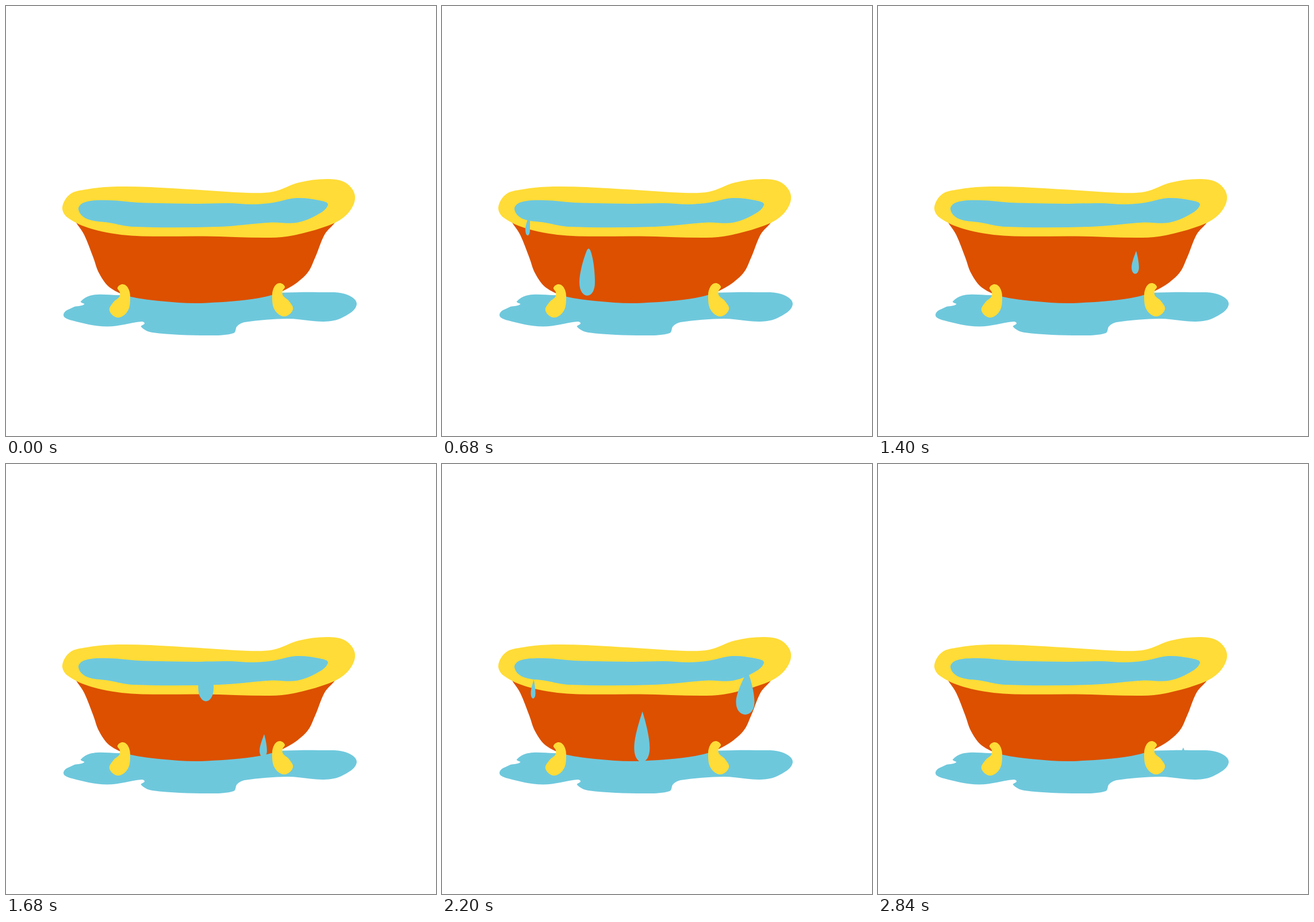
Write an HTML page that moves like this. It is 748 by 748 pixels and loops after 2.88 s.

```html
<!DOCTYPE html>
<html lang="en">
<head>
<meta charset="utf-8">
<title>Dripping bathtub</title>
<style>
  html, body { margin: 0; width: 100%; height: 100%; overflow: hidden; background: #fff; }
  svg { display: block; width: 100%; height: 100%; }
</style>
</head>
<body>
<svg viewBox="0 0 748 748" xmlns="http://www.w3.org/2000/svg">
  <defs>
    <clipPath id="fall">
      <path id="basin"/>
      <rect x="0" y="354" width="748" height="174"/>
    </clipPath>
  </defs>
  <g id="still"></g>
  <g id="drops" clip-path="url(#fall)"></g>
</svg>
<script>
const LOOP = 2880, STEP = 40;
const BLUE = '#6ec8dc', YELLOW = '#ffdc37', ORANGE = '#dc5000';

// Key points of each closed outline
const puddle = '100,537 117,524 136,519 130,514 150,503 195,503 300,505 485,498.5 545,498 590,501 610,519 585,542 553,549 490,544 415,550 402,557 396,569 350,573 255,568 235,558 241,552 236,549 175,557.5 115,547';
const tub = '116,362 136,398 152,438 162,465 181,490 218,506 300,516 350,516.5 440,508 487,493 523,466 538,437 554,398 577,366 560,352 130,352';
const rim = '98,350 112,327 140,319 182,314.5 250,315 330,319.5 420,325 465,323 510,307 558,301 590,307 607,330 597,358 568,379 500,399 460,403 345,400.5 218,399.5 150,388 107,368';
const water = '126,353 138,341 180,338 230,342 330,344 385,343 430,345 465,342 505,334 547,338.5 560,346 540,364 505,377 462,376.5 370,384 222,384 180,377 140,370';
const foot = '194,490 203,484 212,490 216,505 212,530 195,542 180,530 187,515 197,506 198,498';

// (x, y): tip of the drop at time t; v: px per ms; w: half width, h: height
const drops = [
  { x: 255, y: 422, t: 680, v: .25, w: 13.5, h: 82, lean: -2.5, round: 3 },
  { x: 152, y: 447, t: 1120, v: .195, w: 4, h: 38, lean: -3 },
  { x: 550, y: 491, t: 1120, v: .44, w: 4.2, h: 32 },
  { x: 449, y: 382, t: 1120, v: .157, w: 6.4, h: 40, lean: -1.5 },
  { x: 348.6, y: 430.5, t: 2200, v: .203, w: 13.5, h: 88, lean: -.8 },
  { x: 531, y: 426, t: 2520, v: .209, w: 16, h: 77, lean: -3.5 },
  { x: 159.5, y: 375, t: 2200, v: .209, w: 4, h: 33, lean: -1 }
];

// Smooth curve through the points, handles a third of each chord long
function smooth(text) {
  const p = text.split(' ').map(s => s.split(',').map(Number)), n = p.length;
  const dist = (a, b) => Math.hypot(b[0] - a[0], b[1] - a[1]);
  let d = 'M' + p[0];
  for (let i = 0; i < n; i++) {
    const [a, b, c, e] = [n - 1, 0, 1, 2].map(k => p[(i + k) % n]);
    const len = dist(b, c) / 3;
    const handle = (q, from, to) => q.map((v, j) => v + (to[j] - from[j]) * len / dist(from, to));
    d += 'C' + [handle(b, a, c), handle(c, e, b), c].join(' ');
  }
  return d + 'Z';
}

function teardrop({ w, h, lean = 0, round = 0 }) {
  const neck = round + w * .4, left = lean - w, right = lean + w;
  return `M${-round} ${round}Q0 ${-round} ${round} ${round}` +
    `C${neck} ${h * .2} ${right} ${h * .5} ${right} ${h * .72}` +
    `C${right} ${h * 1.09} ${left} ${h * 1.09} ${left} ${h * .72}` +
    `C${left} ${h * .5} ${-neck} ${h * .2} ${-round} ${round}Z`;
}

const byId = id => document.getElementById(id);

function addPath(parent, d, fill) {
  const el = document.createElementNS('http://www.w3.org/2000/svg', 'path');
  el.setAttribute('d', d);
  el.setAttribute('fill', fill);
  return byId(parent).appendChild(el);
}

const addShape = (points, fill) => addPath('still', smooth(points), fill);
addShape(puddle, BLUE);
addShape(tub, ORANGE);
addShape(rim, YELLOW);
addShape(water, BLUE);
addShape(foot, YELLOW);
addShape(foot, YELLOW).setAttribute('transform', 'matrix(-1 0 0 1 679 -2)');
byId('basin').setAttribute('d', smooth(water));
for (const drop of drops) drop.el = addPath('drops', teardrop(drop), BLUE);

function draw(ms) {
  const now = Math.floor(ms % LOOP / STEP) * STEP;
  for (const { el, x, y, t, v } of drops) {
    el.setAttribute('transform', `translate(${x} ${y + v * (now - t)})`);
  }
}

const start = performance.now();
function tick() {
  draw(performance.now() - start);
  requestAnimationFrame(tick);
}
draw(0);
requestAnimationFrame(tick);
</script>
</body>
</html>
```
